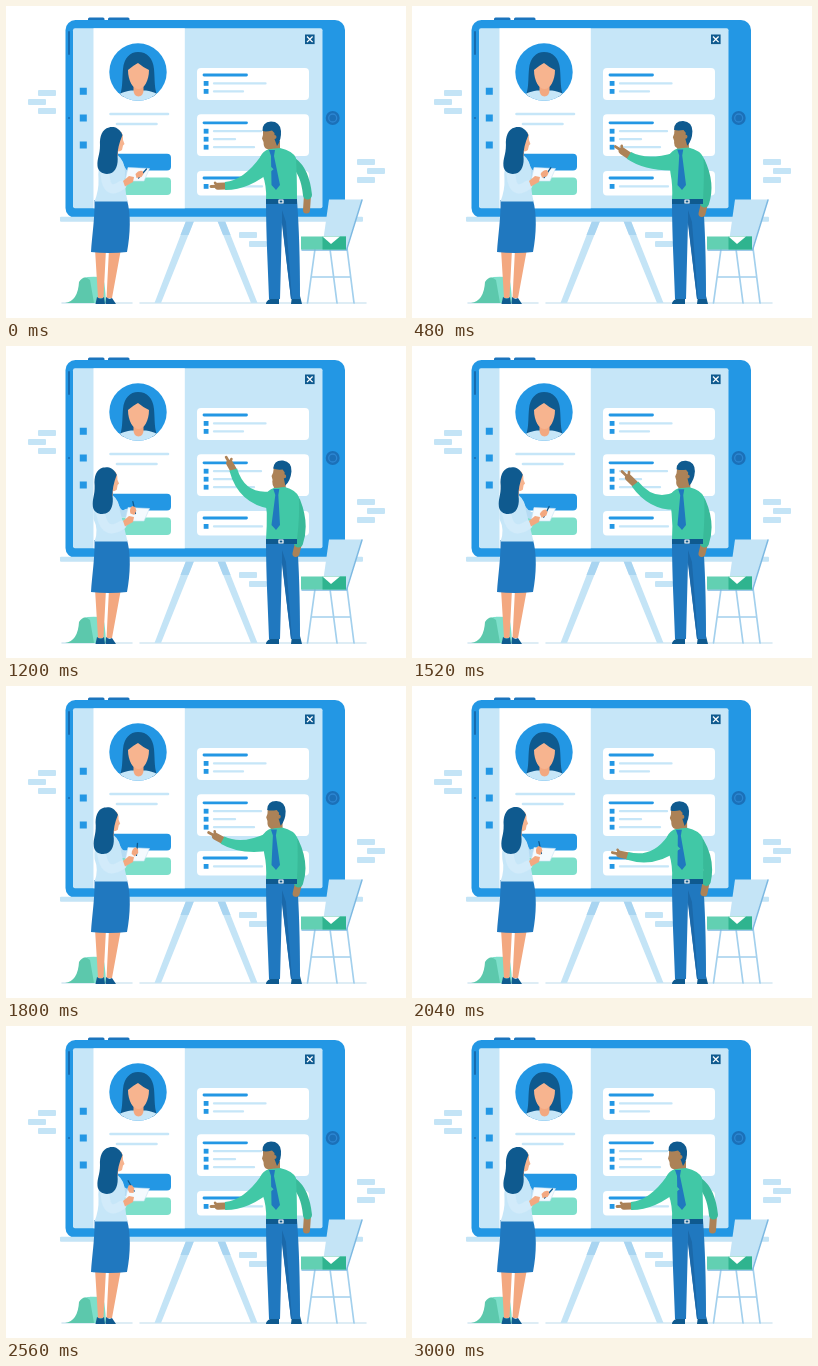
Recreate the animation shown at these times as an HTML page. Size 400x312 px, loop 3040 ms.

```html
<!DOCTYPE html>
<html lang="en">
<head>
<meta charset="utf-8">
<title>Presentation</title>
<style>
html, body { margin: 0; width: 100%; height: 100%; overflow: hidden; background: #fff; }
svg { display: block; width: 400px; height: 312px; }
.pale { fill: #c4e4f6; }
.sky { fill: #c6e6f8; }
.blue { fill: #2397e4; }
.mid { fill: #2078bf; }
.navy { fill: #0f5a8f; }
.mint { fill: #7ddfca; }
.green { fill: #41c8a6; }
.skin { fill: #f3a880; }
.tan { fill: #ac8257; }
.white { fill: #fff; }
.line { fill: none; stroke-linecap: round; stroke-linejoin: round; }
</style>
</head>
<body>
<svg viewBox="0 0 400 312">
  <g class="pale" id="bricks"></g>
  <path class="line" stroke="#d3e7f2" stroke-width="1.500" d="M56 297H126M134 297H268M236 297H304M293 297H360"/>

  <!-- easel -->
  <path class="pale" d="M180 215h8L155 297h-6.500ZM211.500 215h7.500L251.500 297h-6.500Z"/>
  <path fill="#a9d5f1" d="M180 215h8L182.500 229h-8ZM211.500 215h7.500L224.500 229h-7.500Z"/>

  <!-- tablet -->
  <path fill="#1a74bd" d="M82 15V13q0-1.500 1.500-1.500H97q1.500 0 1.500 1.500v2ZM102 15V13q0-1.500 1.500-1.500H122q1.500 0 1.500 1.500v2Z"/>
  <rect x="59.500" y="14" width="279.500" height="198" rx="10" class="blue"/>
  <path class="line" stroke="#1668ab" stroke-width="1.800" d="M63 26V48M63 112v.1"/>
  <rect x="67" y="22.300" width="249.500" height="180" rx="2" class="sky"/>
  <rect x="87.500" y="22.300" width="91.300" height="180" class="white"/>
  <circle cx="326.700" cy="112" r="7" fill="#1b70b8"/>
  <circle cx="326.700" cy="112" r="4" fill="none" stroke="#2c86d2" stroke-width="1.300"/>
  <path class="blue" d="M73.800 81.800h7v7h-7ZM73.800 108.600h7v7h-7ZM73.800 135.400h7v7h-7Z"/>
  <rect x="299" y="28.500" width="9.600" height="9.600" class="navy"/>
  <path d="M301 30.500l5.600 5.600m0-5.600l-5.600 5.600" stroke="#fff" stroke-width="1.300"/>

  <!-- profile -->
  <clipPath id="round"><circle cx="132" cy="66" r="28.700"/></clipPath>
  <circle cx="132" cy="66" r="28.700" class="blue"/>
  <g clip-path="url(#round)">
    <path class="navy" d="M113 91C117 84 116 73 117 63C118 52 124 46 132 46C141 46 147 52 148 63C149 73 148 84 152 91Z"/>
    <path class="sky" d="M107 98C109 88 116 86 125 84.500H140C149 86 155 88 157 98Z"/>
    <path class="skin" d="M127.500 76h10v9Q137 90 132.500 90.500Q128 90 127.500 85Z"/>
    <path fill="#f7b48f" d="M122 64Q128 59 132 57Q138 62 143 64C143 75 138 83 132.500 83C127 83 122 75 122 64Z"/>
  </g>
  <path class="line" stroke="#c6e6f8" stroke-width="2.600" d="M104.500 108H162M111 118H150.500"/>
  <rect x="100" y="147.700" width="65" height="16.700" rx="4" class="blue"/>
  <rect x="100" y="171.500" width="65" height="17.500" rx="4" class="mint"/>
  <g id="cards"></g>

  <rect x="54" y="210.700" width="303" height="5" rx="1" class="pale"/>

  <!-- bag -->
  <path class="mint" d="M78 272Q82 270 96 271Q99 273 100 297H74Z"/>
  <path fill="#5cc8ac" d="M73 276Q78 268 84 274L88 297H59Q72 295 73 276Z"/>

  <!-- chair -->
  <path class="line" stroke="#a3d0ed" stroke-width="1.700" d="M309 243L301.500 297M324 243L331 297M341 242L348 297M305 271H344"/>
  <path class="pale" d="M323 193.500H356L340 243H316Z"/>
  <path class="line" stroke="#7db9e2" stroke-width="1.500" d="M356 194L340.500 244H296"/>
  <path fill="#62d0b2" d="M295 230.500H340V243.500H295Z"/>
  <path fill="#2fb48f" d="M316.500 230.500H340V243.500H316.500Z"/>
  <path class="white" d="M316.500 230.500H334L325 238Z"/>

  <!-- woman -->
  <path class="skin" d="M89 243H100L97.500 292H92ZM103 243H115L106 292H100.500Z"/>
  <path class="navy" d="M91 291Q95 294 98 291L99 298H89.500ZM100 291Q103 294 106 292L110 298H99.500Z"/>
  <path class="mid" d="M88.500 194H121C125 208 124.500 228 121 246Q103 248 85 246C86 230 89 211 88.500 194Z"/>
  <path class="line" id="farArm" stroke="#b5dbf3" stroke-width="7"/>
  <path fill="#f4fafe" stroke="#c6e1f3" stroke-width=".6" d="M122 161.500L143.500 162.500 138 175H119Z"/>
  <g id="writer">
    <path class="line" stroke="#0f5a8f" stroke-width="1.300" d="M-2 4L6 -5"/>
    <path class="skin" d="M-5 0Q-2 -4 2 -3L3 0 1 3 -4 4Z"/>
  </g>
  <path class="sky" id="blouse"/>
  <path class="line" id="nearArm" stroke="#d2ebfa" stroke-width="9"/>
  <path class="skin" d="M117 175L123 170 128 171 127 176 119 180.500Z"/>
  <g id="womanHead">
    <path class="skin" d="M104 141H112V150Q107 154 103 150Z"/>
    <path fill="#f7b48f" d="M106 126H115.500Q117.500 130 117 134L118.500 138 117 139.500 116 144Q112 147 106 144Z"/>
    <path class="navy" d="M116.500 129C113 121 107 120.500 103 121.500C96 123 93.500 131 94 139C94 149 91 152 91.500 160C92 166 98 169 104 167.500C110 166 112.500 158 111.500 150C111.500 144 113 137 116.500 129Z"/>
  </g>

  <!-- man -->
  <path class="navy" d="M263 290H273V298H260Q260 295 264 293ZM286 290H294L296 298H285Z"/>
  <path class="mid" d="M260 194H291C293 222 294 252 294 293H285L276 216 274 293H263C262 260 260 230 260 194Z"/>
  <path fill="#1b69aa" d="M276 204L280 216 286 293H285L276 218Z"/>
  <path class="line" id="backHand" stroke="#ac8257" stroke-width="7"/>
  <path class="line" id="backArm" stroke="#39ba99" stroke-width="9"/>
  <g id="manNeck"><path class="tan" d="M261 135H274V148Q268 151 263 147Z"/></g>
  <path class="green" id="shirt"/>
  <path class="mid" id="tie"/>
  <path class="navy" d="M260 193H291V198H260Z"/>
  <path class="line" stroke="#fff" stroke-width="1.200" d="M273 194H277V197H273Z"/>
  <g id="manHead">
    <path class="tan" d="M257 121H271V139Q266 144 261 143Q257.500 142 257.500 136L256 132.500 257 129Z"/>
    <path class="navy" d="M256.500 125Q256 116 265 115.500Q274 115.500 275 125Q275.500 134 271 140L268.500 133V127L266 124.500Q260 126 256.500 125Z"/>
    <circle cx="268.500" cy="131" r="2" class="tan"/>
  </g>
  <path class="line" id="foreHand" stroke="#ac8257" stroke-width="7"/>
  <path class="line" id="finger" stroke="#ac8257" stroke-width="2.800"/>
  <path class="line" id="thumb" stroke="#ac8257" stroke-width="2.600"/>
  <path class="green" id="sleeve"/>
</svg>
<script>
const LOOP = 3040;
const byId = id => document.getElementById(id);
const set = (id, name, value) => byId(id).setAttribute(name, value);
const mix = (a, b, k) => a + (b - a) * k;
const mixPoint = (a, b, k) => a.map((v, i) => mix(v, b[i], k));
const ease = k => (1 - Math.cos(Math.PI * Math.min(1, Math.max(0, k)))) / 2;
const pt = p => p.map(v => v.toFixed(2)).join(' ');

const bricks = [[32, 84], [22, 93], [32, 102], [351, 153], [361, 162], [351, 171], [233, 226], [243, 235]];
byId('bricks').innerHTML = bricks.map(([x, y]) =>
  `<rect x="${x}" y="${y}" width="18" height="6" rx="1"/>`).join('');

function card(y, height, headerY, ends) {
  const rows = ends.map((end, i) => {
    const rowY = headerY + 8.4 + i * 8;
    return `<rect x="197.700" y="${rowY - 2.400}" width="4.800" height="4.800" class="blue"/>
      <path class="line" stroke="#c6e6f8" stroke-width="2.300" d="M208 ${rowY}H${end}"/>`;
  }).join('');
  return `<rect x="191" y="${y}" width="112" height="${height}" rx="4" class="white"/>
    <path class="line" stroke="#2397e4" stroke-width="2.800" d="M198 ${headerY}H240.500"/>${rows}`;
}
byId('cards').innerHTML = card(62, 32, 69, [259.5, 237]) +
  card(108.3, 41.7, 116.8, [255, 229, 248]) + card(165, 24.5, 172, [256]);

// Each pose: raise amount, elbow, wrist, fingertip.
const armPoses = [
  [0, [240, 174], [219, 180], [205, 180.5]],
  [.2, [240, 170], [215, 169], [200, 165.5]],
  [.5, [237, 156], [217, 149], [203.5, 140]],
  [.72, [242, 153.5], [223, 138], [210, 125.5]],
  [1, [241, 145], [228, 121], [222, 108.5]]
];
const penStops = [[0, 1], [480, .9], [880, 0], [1200, .25], [1520, .8], [2040, .25], [2560, 0], [3000, 1], [3040, 1]];

function segment(list, value) {
  let i = 1;
  while (i < list.length - 1 && value > list[i][0]) i++;
  const a = list[i - 1], b = list[i];
  return [a, b, (value - a[0]) / (b[0] - a[0])];
}

const raiseAt = t => ease((t - 20) / 930) - ease((t - 1010) / 1440);
const leanAt = t => ease((t - 450) / 430) - ease((t - 1500) / 1000);

// Closed sleeve tapering from shoulder to cuff, its middle passing through the elbow.
function sleevePath(shoulder, elbow, wrist) {
  const normal = (a, b, w) => {
    const dx = b[0] - a[0], dy = b[1] - a[1], n = Math.hypot(dx, dy);
    return [-dy / n * w, dx / n * w];
  };
  const shift = (p, n, s) => pt([p[0] + n[0] * s, p[1] + n[1] * s]);
  const bend = elbow.map((v, i) => 2 * v - (shoulder[i] + wrist[i]) / 2);
  const ns = normal(shoulder, bend, 9), ne = normal(shoulder, wrist, 5.5), nw = normal(bend, wrist, 4);
  return `M${shift(shoulder, ns, 1)}Q${shift(bend, ne, 1)} ${shift(wrist, nw, 1)}` +
    `L${shift(wrist, nw, -1)}Q${shift(bend, ne, -1)} ${shift(shoulder, ns, -1)}Z`;
}

function drawMan(r) {
  const [a, b, k] = segment(armPoses, r);
  const [elbow, wrist, tip] = [1, 2, 3].map(i => mixPoint(a[i], b[i], k));
  const shoulder = [mix(261, 266, r), mix(157, 154, r)];
  const knuckle = mixPoint(wrist, tip, .5);
  const dx = tip[0] - wrist[0], dy = tip[1] - wrist[1];
  set('sleeve', 'd', sleevePath(shoulder, elbow, wrist));
  set('foreHand', 'd', `M${pt(wrist)}L${pt(knuckle)}`);
  set('finger', 'd', `M${pt(knuckle)}L${pt(tip)}`);
  set('thumb', 'd', `M${pt(knuckle)}l${pt([dx * .2 - dy * .25, dy * .2 + dx * .25])}`);

  const left = mix(254, 259, r), right = mix(290, 293, r), top = mix(147, 146, r);
  set('shirt', 'd', `M${left} ${top + 4}Q${left + 3} ${top - 2} ${left + 9} ${top - 4}` +
    `L${left + 20} ${top - 5}Q${right - 3} ${top - 2} ${right} ${top + 5}Q${right + 1} 170 291 194H260` +
    `Q261 180 ${left + 2} 167Z`);
  const knot = mix(266, 270.5, r);
  set('tie', 'd', `M${knot - 3} ${top - 3}H${knot + 3}L${knot + 2} ${top + 3}L274 179 270 184 265.500 179 ${knot - 1} ${top + 3}Z`);

  // The resting arm drops early in the raise.
  const drop = 1 - (1 - r) ** 8;
  const cuff = [mix(301.5, 292.5, drop), mix(189, 197, drop)];
  set('backArm', 'd', `M${pt([right - 3, top + 9])}Q${pt([299, mix(165, 178, drop)])} ${pt(cuff)}`);
  set('backHand', 'd', `M${pt(cuff)}L${pt([mix(300.5, 290, drop), mix(204, 207.5, drop)])}`);
  set('manHead', 'transform', `translate(${9 * r} ${-r}) rotate(${9 * r} 267 138)`);
  set('manNeck', 'transform', `translate(${6 * r} 0)`);
}

function drawWoman(lean, pen) {
  const x = v => (v - 5 * lean).toFixed(2);
  set('womanHead', 'transform', `translate(${-5 * lean} 0) rotate(${-2 * lean} 106 150)`);
  set('blouse', 'd', `M${x(95)} 158Q${x(102)} 148 ${x(112)} 149.500Q${x(118)} 154 ${x(119)} 165Q118 180 121.500 195.500H88.500` +
    `Q93 184 ${x(92.5)} 173Q${x(91.5)} 163 ${x(95)} 158Z`);
  const hand = [mix(125, 134.5, pen), mix(162, 168, pen)];
  set('farArm', 'd', `M${x(113)} 157Q${x(119)} 172 ${pt([hand[0] - 7, hand[1] + 3])}`);
  set('nearArm', 'd', `M${x(99)} 161Q${mix(98, 96, lean)} 192 116 179`);
  set('writer', 'transform', `translate(${pt(hand)}) rotate(${mix(-72, 0, pen)})`);
}

function draw(t) {
  const [a, b, k] = segment(penStops, t);
  drawMan(raiseAt(t));
  drawWoman(leanAt(t), mix(a[1], b[1], ease(k)));
}

const start = performance.now();
function tick(now) {
  draw(Math.max(0, now - start) % LOOP);
  requestAnimationFrame(tick);
}
draw(0);
requestAnimationFrame(tick);
</script>
</body>
</html>
```
